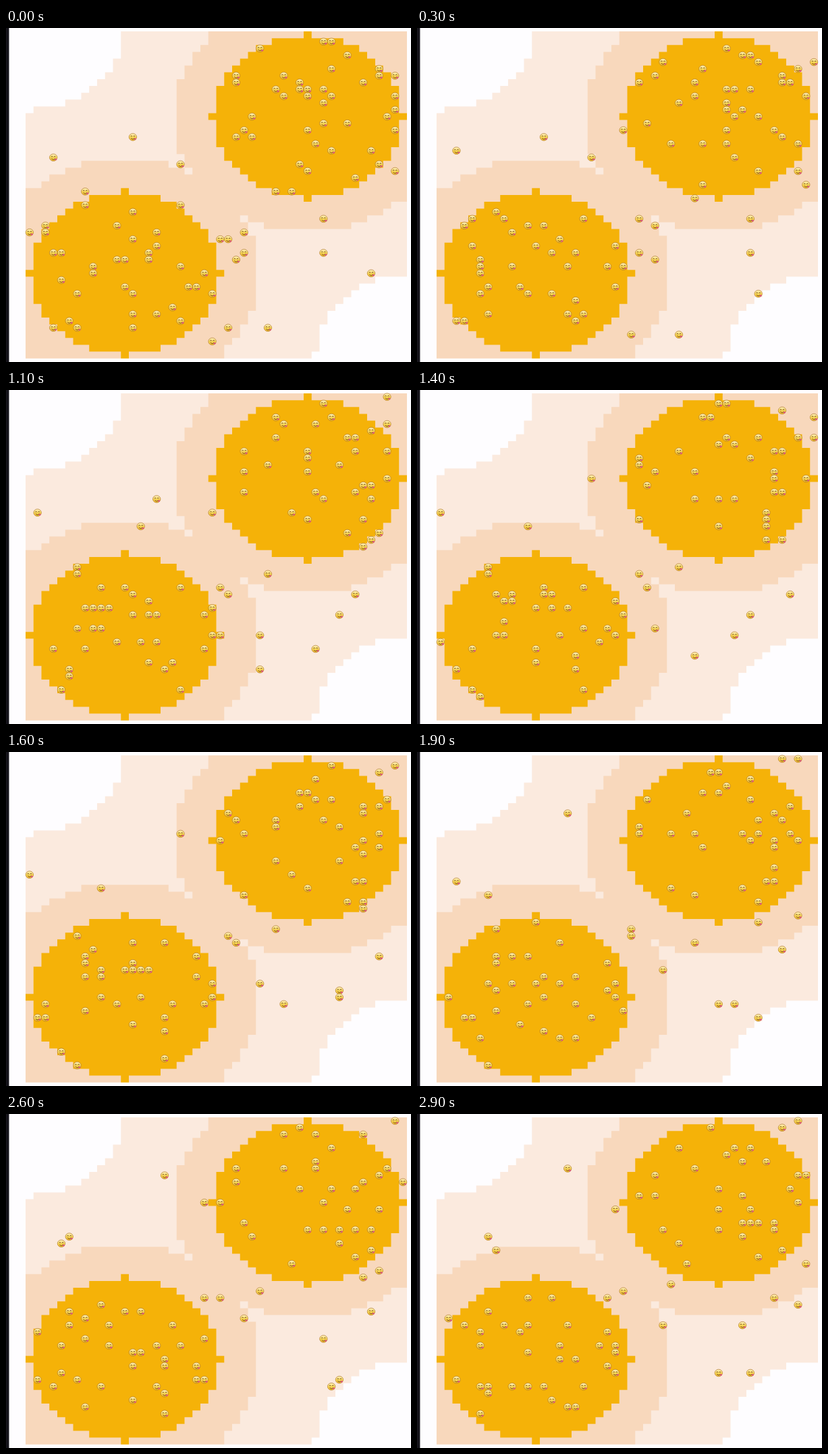
Recreate the animation shown at these times as an HTML page with a canvas. Size 600x496 px, loop 3 s.

```html
<!DOCTYPE html>
<html lang="en">
<head>
<meta charset="utf-8">
<title>Foraging agents</title>
<style>
  html, body { margin: 0; width: 600px; height: 496px; overflow: hidden; background: #fefdff; }
  canvas { display: block; }
</style>
</head>
<body>
<canvas id="stage" width="600" height="496"></canvas>
<script>
const ctx = document.getElementById('stage').getContext('2d');
const WIDTH = 600, HEIGHT = 496;
const SIZE = 48, STEPS = 30, STEP_MS = 100;
const LEFT = 29, TOP = 5.1, CELL_W = 11.77, CELL_H = 10.117;
const COLORS = ['#fefdff', '#fbeade', '#f8d8bc', '#f5b208'];
const APPEAL = [0, 0.3, 0.3, 1];
const START_COUNT = 92, FINAL_COUNT = 80;

function seeded(seed) {
  return () => {
    seed = (seed + 0x6D2B79F5) | 0;
    let n = Math.imul(seed ^ (seed >>> 15), 1 | seed);
    n = (n + Math.imul(n ^ (n >>> 7), 61 | n)) ^ n;
    return ((n ^ (n >>> 14)) >>> 0) / 4294967296;
  };
}

const distance = (col, row, [x, y]) => Math.hypot(col - x, row - y);
const nearest = (col, row, points) => Math.min(...points.map(p => distance(col, row, p)));

// Two rich hills, and two barren discs at the opposite corners.
const PEAKS = [[12, 35], [35, 12]];
const BARREN = [[0, -1], [48, 47]];

function levelAt(col, row) {
  if (Math.min(col, row) < 0 || Math.max(col, row) >= SIZE) return 0;
  const toPeak = nearest(col, row, PEAKS);
  if (toPeak <= 12) return 3;
  if (toPeak < 17) return 2;
  return nearest(col, row, BARREN) <= 12 ? 0 : 1;
}

function simulate() {
  const random = seeded(17);
  const pick = n => Math.floor(random() * n);
  const key = (col, row) => row * SIZE + col;
  const taken = new Set();
  let agents = [];

  while (agents.length < START_COUNT) {
    const col = pick(SIZE), row = pick(SIZE);
    if (taken.has(key(col, row)) || random() >= APPEAL[levelAt(col, row)]) continue;
    taken.add(key(col, row));
    agents.push({ col, row });
  }

  function wander({ col, row }) {
    const here = APPEAL[levelAt(col, row)];
    for (let attempt = 0; attempt < 4; attempt++) {
      const nextCol = col + pick(3) - 1, nextRow = row + pick(3) - 1;
      const chance = APPEAL[levelAt(nextCol, nextRow)] / here;
      if (taken.has(key(nextCol, nextRow)) || random() >= chance) continue;
      taken.delete(key(col, row));
      taken.add(key(nextCol, nextRow));
      return { col: nextCol, row: nextRow };
    }
    return { col, row };
  }

  const history = [agents];
  for (let step = 1; step < STEPS; step++) {
    const extra = (START_COUNT - FINAL_COUNT) * Math.exp(-step / 4);
    agents = agents.slice(0, Math.round(FINAL_COUNT + extra)).map(wander);
    taken.clear();
    agents.forEach(a => taken.add(key(a.col, a.row)));
    history.push(agents);
  }
  return history;
}

// Drawn large and scaled down, so that cell edges between pixels stay soft.
function makeLand() {
  const scale = 4;
  const large = document.createElement('canvas');
  large.width = WIDTH * scale;
  large.height = HEIGHT * scale;
  const g = large.getContext('2d');
  const edgeX = col => Math.round((LEFT + col * CELL_W) * scale);
  const edgeY = row => Math.round((TOP + row * CELL_H) * scale);
  g.fillStyle = COLORS[0];
  g.fillRect(0, 0, large.width, large.height);
  for (let row = 0; row < SIZE; row++) {
    for (let col = 0; col < SIZE; col++) {
      const x = edgeX(col), y = edgeY(row);
      g.fillStyle = COLORS[levelAt(col, row)];
      g.fillRect(x, y, edgeX(col + 1) - x, edgeY(row + 1) - y);
    }
  }
  g.fillStyle = '#15131a';
  g.fillRect(0, 0, 4.5 * scale, large.height);

  const land = document.createElement('canvas');
  land.width = WIDTH;
  land.height = HEIGHT;
  const small = land.getContext('2d');
  small.imageSmoothingQuality = 'high';
  small.drawImage(large, 0, 0, WIDTH, HEIGHT);
  return land;
}

function oval(x, y, rx, ry, fill) {
  ctx.beginPath();
  ctx.ellipse(x, y, rx, ry, 0, 0, Math.PI * 2);
  ctx.fillStyle = fill;
  ctx.fill();
}

function drawFace({ col, row }) {
  ctx.save();
  ctx.translate(LEFT + (col + 0.5) * CELL_W, TOP + (row + 0.5) * CELL_H);
  const skin = ctx.createLinearGradient(0, -5, 0, 5);
  skin.addColorStop(0, '#fdf0c0');
  skin.addColorStop(0.5, '#f9d95a');
  skin.addColorStop(1, '#efb72a');
  oval(0, 0, 5.7, 5.3, skin);
  ctx.strokeStyle = '#b07a2a';
  ctx.lineWidth = 0.7;
  ctx.stroke();

  ctx.strokeStyle = '#6b4518';
  ctx.lineWidth = 0.9;
  for (const x of [-2.1, 2.1]) {
    ctx.beginPath();
    ctx.arc(x, -0.7, 1, Math.PI, 0);
    ctx.stroke();
  }
  ctx.beginPath();
  ctx.arc(0, 0.6, 2.6, 0.3, Math.PI - 0.3);
  ctx.stroke();
  oval(3.4, 2.9, 1.6, 1.4, '#dc5a78');
  ctx.restore();
}

const land = makeLand();
const history = simulate();
const began = performance.now();

function draw() {
  const step = Math.floor((performance.now() - began) / STEP_MS) % STEPS;
  ctx.drawImage(land, 0, 0);
  history[step].forEach(drawFace);
  requestAnimationFrame(draw);
}
draw();
</script>
</body>
</html>
```
